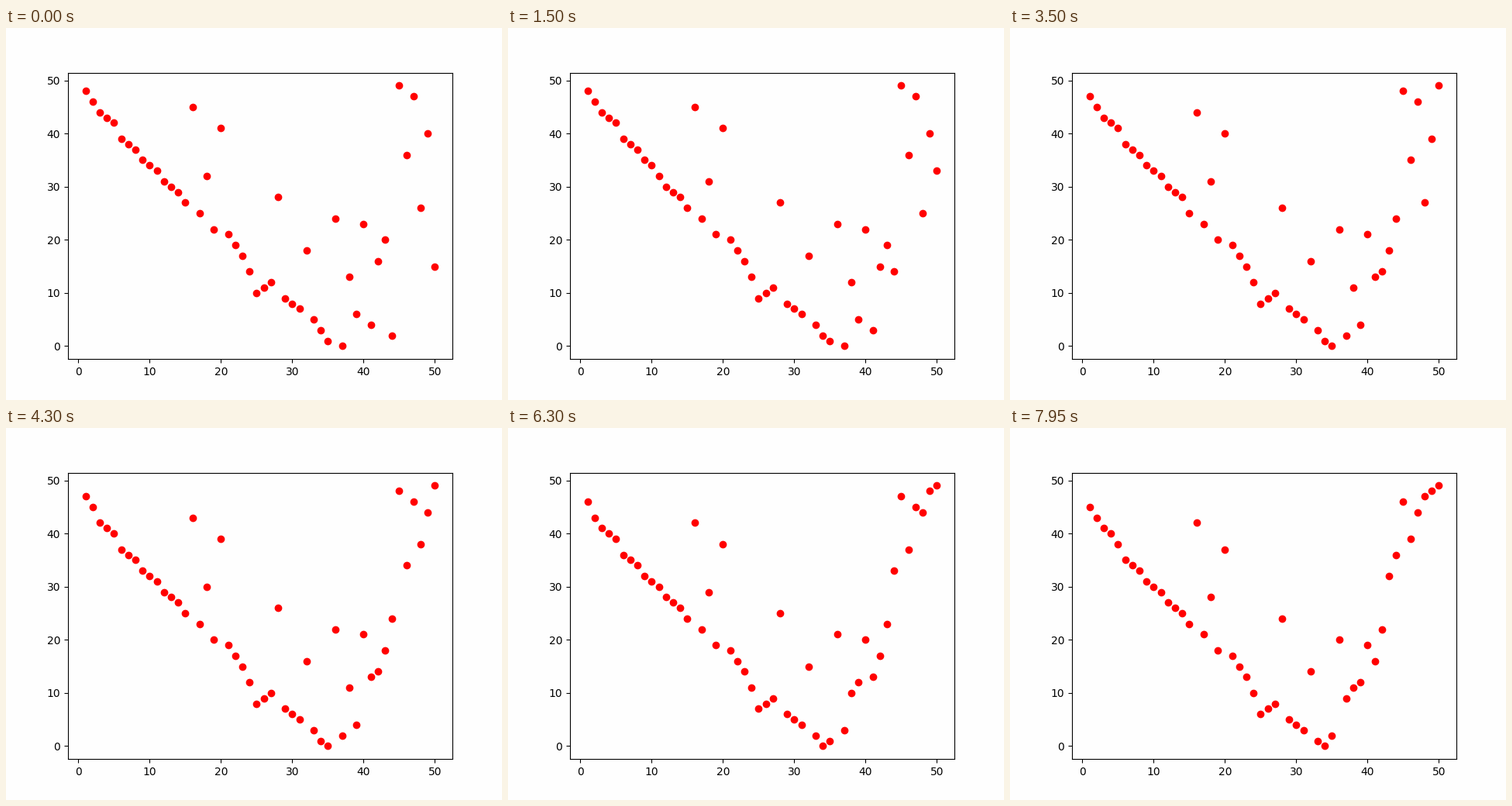
Recreate the animation shown at these times as a matplotlib script. Size 640 by 480 pixels, loop 8 s.

```python
import matplotlib.pyplot as plt
from matplotlib.animation import FuncAnimation

SIZE = 50
FRAMES = 160
INTERVAL = 50
PAPER = "#fefefe"
FIRST = 2  # index the running bubble pass has reached


def start_list():
    """A falling run of values with a few strays dropped in between."""
    place = {16: 45, 18: 32, 20: 41, 28: 28, 32: 18, 36: 24}
    high = [13, 6, 23, 4, 16, 20, 2, 49, 36, 47, 26, 40, 15]
    place.update(zip(range(SIZE - len(high) + 1, SIZE + 1), high))

    stray = {i: value for value, i in place.items()}
    falling = (v for v in range(SIZE, 0, -1) if v not in place)
    a = [stray[i] if i in stray else next(falling) for i in range(SIZE)]
    a[10:13] = a[10:13][::-1]
    return a


def bubble_states(values, first):
    """Yield the list at the start and after every swap."""
    a = list(values)
    yield a[:]
    swapped = True
    while swapped:
        swapped = False
        for j in range(first, len(a) - 1):
            if a[j] > a[j + 1]:
                a[j], a[j + 1] = a[j + 1], a[j]
                swapped = True
                yield a[:]
        first = 0


states = [s for _, s in zip(range(FRAMES), bubble_states(start_list(), FIRST))]

fig, ax = plt.subplots(figsize=(6.4, 4.8), dpi=100, facecolor=PAPER)
ax.set_facecolor(PAPER)
dots, = ax.plot(states[0], range(SIZE), "ro")


def update(i):
    dots.set_xdata(states[i])
    return dots,


anim = FuncAnimation(fig, update, frames=FRAMES, interval=INTERVAL,
                     repeat=True, repeat_delay=0)
plt.show()
```
